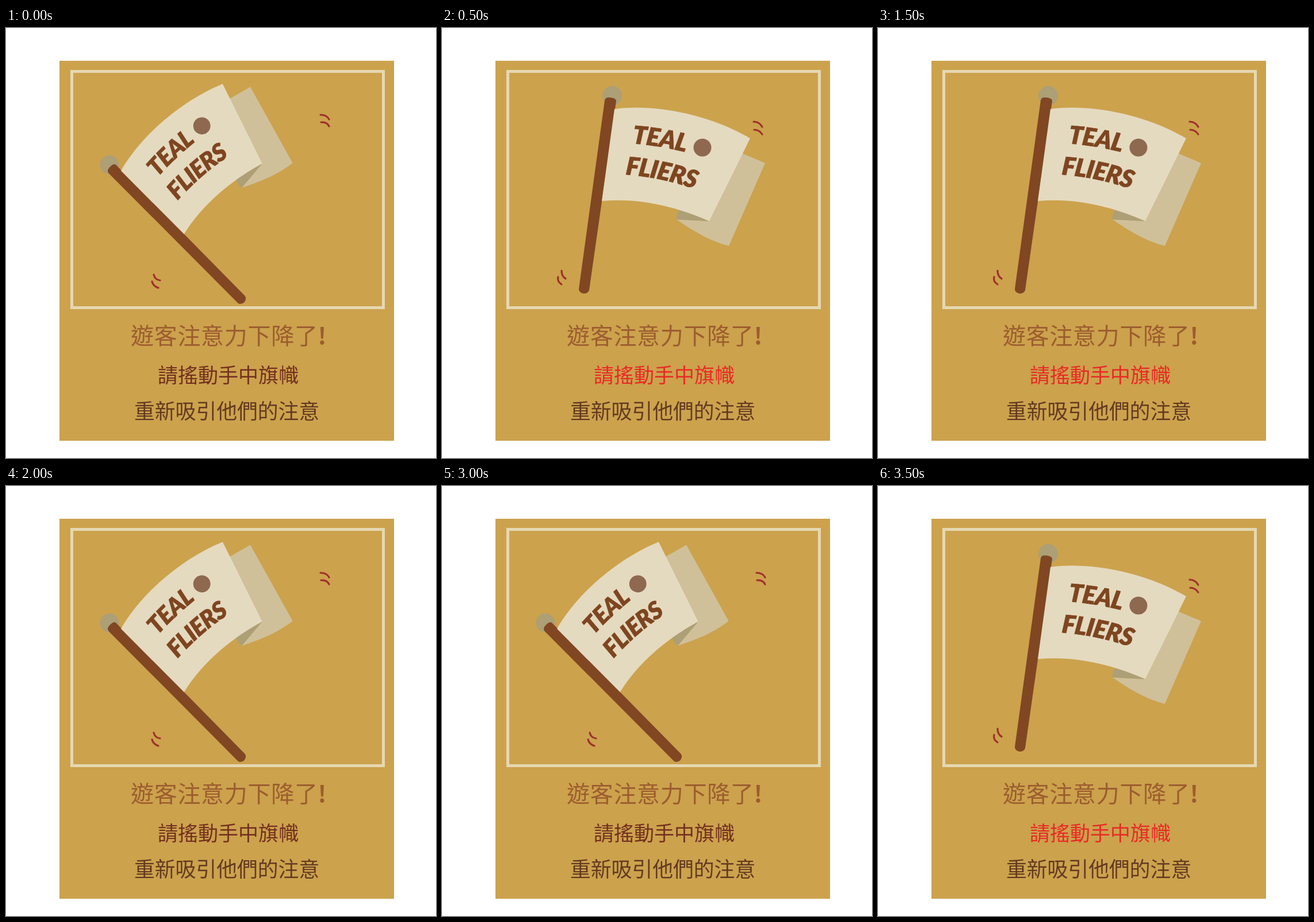
Animation, 748 px wide and 748 px high, one loop 4 s. Source, as an HTML page:

```html
<!DOCTYPE html>
<html lang="zh-Hant">
<head>
<meta charset="utf-8">
<title>搖動旗幟</title>
<style>
  html, body { margin: 0; width: 100%; height: 100%; overflow: hidden; background: #fff; }
  svg { display: block; width: 100vw; height: 100vh; }
  .caption { font-family: "Noto Sans CJK TC", "Noto Sans CJK", sans-serif; font-weight: 500; }
  .label { font: italic 900 43px Lato, sans-serif; letter-spacing: -1px; fill: #7e4520; stroke: #7e4520; stroke-width: .8; }
  .marks path { fill: none; stroke: #9f302b; stroke-width: 3.2; stroke-linecap: round; }
</style>
</head>
<body>
<svg viewBox="0 0 748 748">
  <defs>
    <path id="line1" d="M331 201Q378 204 440 220"/>
    <path id="line2" d="M319 255Q390 260 465 289"/>
  </defs>
  <path fill="#cca24d" d="M93 57H675V718H93Z"/>
  <rect x="114.5" y="75.5" width="542" height="411" fill="none" stroke="#e5d8b2" stroke-width="5"/>

  <g id="flag">
    <circle cx="296" cy="118" r="17" fill="#ad9f76"/>
    <path fill="#804722" d="M283 126Q284 120 293 121Q303 122 303 127L256 456Q254 462 246 462Q238 460 238 454Z"/>
    <path fill="#cfc09a" d="M522 218L562 235L499 379C475 373 448 361 408 333L465 336Z"/>
    <path fill="#ad9f76" d="M414 315Q407 324 408 333L465 336Z"/>
    <path fill="#e4dabf" d="M300 141C375 131 470 153 536 192L465 336C420 316 352 294 278 301Z"/>
    <text class="label"><textPath href="#line1">TEAL</textPath></text>
    <text class="label"><textPath href="#line2">FLIERS</textPath></text>
    <circle cx="453" cy="208" r="15.5" fill="#8f6850"/>
  </g>

  <g id="marksTilted" class="marks">
    <path d="M547 151Q558 151 562 159M548 164Q558 163 562 171"/>
    <path d="M257 429Q259 438 268 439M254 441Q256 449 265 452"/>
  </g>
  <g id="marksUpright" class="marks">
    <path d="M542 163Q552 163 557 172M543 177Q552 177 557 185"/>
    <path d="M202 433Q200 441 208 446M208 422Q208 432 215 436"/>
  </g>

  <g class="caption">
    <text x="217" y="550" font-size="40" letter-spacing=".7" fill="#9c5d2e">遊客注意力下降了<tspan font-weight="700">!</tspan></text>
    <text id="prompt" x="264" y="617" font-size="35">請搖動手中旗幟</text>
    <text x="223" y="680" font-size="35.8" fill="#633a20">重新吸引他們的注意</text>
  </g>
</svg>
<script>
  const HALF_SWING = 500;
  const TILT = "matrix(.584 -.7664 .7664 .584 -83.3 395.9)";
  const byId = id => document.getElementById(id);
  const show = (id, visible) => byId(id).setAttribute("visibility", visible ? "visible" : "hidden");
  const start = performance.now();

  function draw(now) {
    const upright = Math.floor(Math.max(0, now - start) / HALF_SWING) % 2 === 1;
    byId("flag").setAttribute("transform", upright ? "" : TILT);
    byId("prompt").setAttribute("fill", upright ? "#e92a24" : "#73301f");
    show("marksUpright", upright);
    show("marksTilted", !upright);
    requestAnimationFrame(draw);
  }
  draw(start);
</script>
</body>
</html>
```
